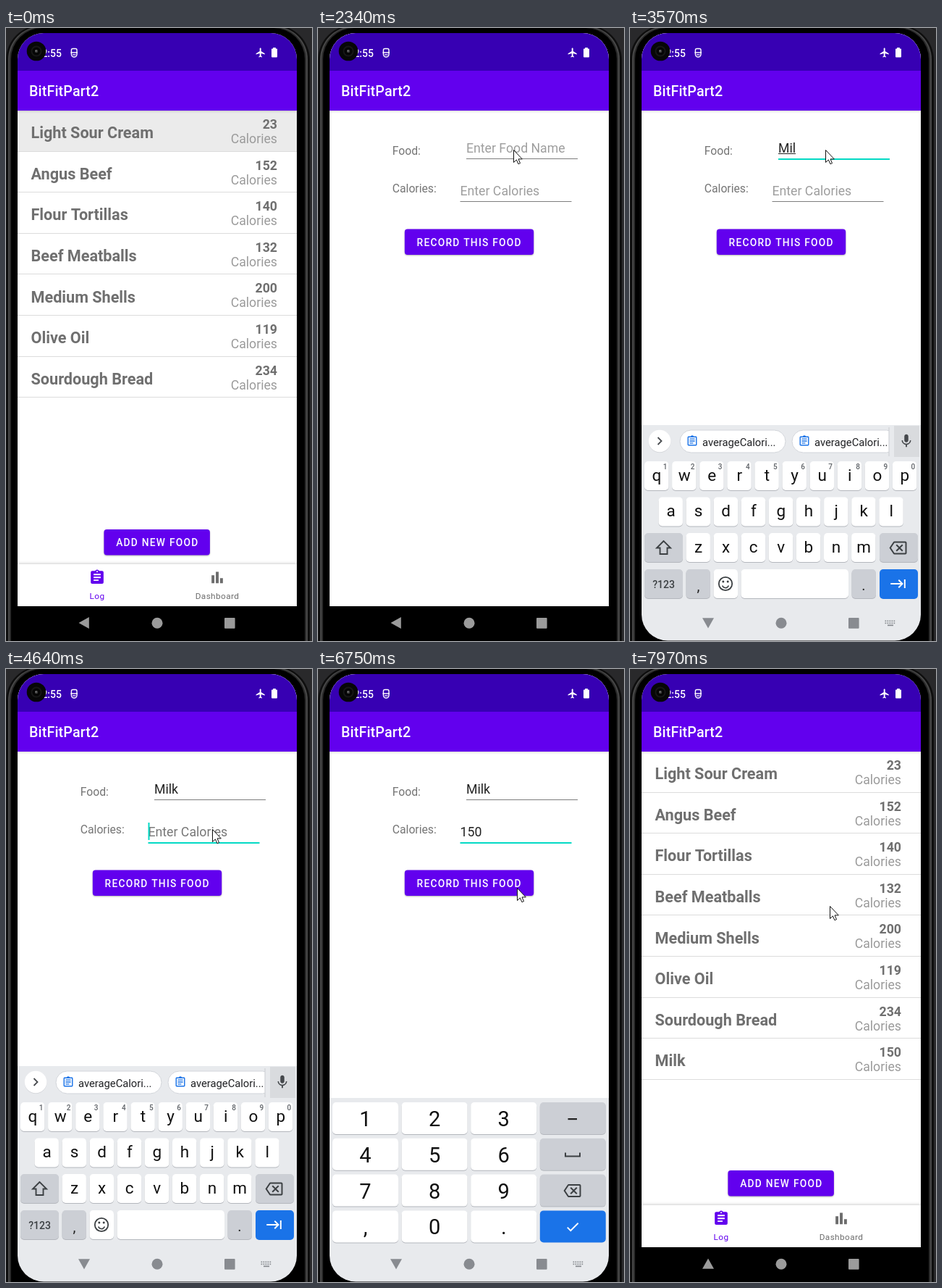
These frames come from a looping animation (423 px wide and 846 px high, 8000 ms). An HTML page with a canvas:

```html
<!DOCTYPE html>
<html lang="en">
<head>
<meta charset="utf-8">
<title>Food log</title>
<style>
html, body { margin: 0; width: 100%; height: 100%; overflow: hidden; background: #2a2a2a; }
canvas { display: block; width: 423px; height: 846px; }
</style>
</head>
<body>
<canvas id="stage"></canvas>
<script>
const W = 423, H = 846, LOOP = 8000;
const canvas = document.getElementById('stage');
const dpr = window.devicePixelRatio || 1;
canvas.width = W * dpr;
canvas.height = H * dpr;
const c = canvas.getContext('2d');

const PURPLE = '#6200ee', DARK = '#3700b3', TEAL = '#03dac5', GREY = '#757575';
const KB = '#e8eaed', KEY_GREY = '#cccfd5', BLUE = '#1a73e8';

const ICON = {
  plane: 'M21 16v-2l-8-5V3.5c0-.83-.67-1.5-1.5-1.5S10 2.67 10 3.5V9l-8 5v2l8-2.5V19l-2 1.5V22l3.5-1 3.5 1v-1.5L13 19v-5.5l8 2.5z',
  log: 'M19 3h-4.18C14.4 1.84 13.3 1 12 1c-1.3 0-2.4.84-2.82 2H5c-1.1 0-2 .9-2 2v14c0 1.1.9 2 2 2h14c1.1 0 2-.9 2-2V5c0-1.1-.9-2-2-2zm-7 0c.55 0 1 .45 1 1s-.45 1-1 1-1-.45-1-1 .45-1 1-1zm2 14H7v-2h7v2zm3-4H7v-2h10v2zm0-4H7V7h10v2z',
  bars: 'M4 9h4v11H4zM16 13h4v7h-4zM10 4h4v16h-4z',
  erase: 'M22 3H7c-.69 0-1.23.35-1.59.88L0 12l5.41 8.11c.36.53.9.89 1.59.89h15c1.1 0 2-.9 2-2V5c0-1.1-.9-2-2-2zm0 16H7.07L2.4 12l4.66-7H22v14zm-11.59-2L14 13.41 17.59 17 19 15.59 15.41 12 19 8.41 17.59 7 14 10.59 10.41 7 9 8.41 12.59 12 9 15.59z',
  next: 'M11.59 7.41L15.17 11H1v2h14.17l-3.59 3.59L13 18l6-6-6-6-1.41 1.41zM20 6v12h2V6h-2z',
  mic: 'M12 14c1.66 0 3-1.34 3-3V5c0-1.66-1.34-3-3-3S9 3.34 9 5v6c0 1.66 1.34 3 3 3zm5.3-3c0 3-2.54 5.1-5.3 5.1S6.7 14 6.7 11H5c0 3.41 2.72 6.23 6 6.72V21h2v-3.28c3.28-.48 6-3.3 6-6.72h-1.7z',
  tick: 'M9 16.17L4.83 12l-1.42 1.41L9 19 21 7l-1.41-1.41z',
  clip: 'M19 3h-4.2a3 3 0 0 0-5.6 0H5c-1.1 0-2 .9-2 2v14c0 1.1.9 2 2 2h14c1.1 0 2-.9 2-2V5c0-1.1-.9-2-2-2zm0 16H5V5h14zM7 7v2h10V7zM7 11v2h10v-2zM7 15v2h7v-2z',
  arrow: 'M0 0V17L3.9 13.4 6.4 19.2 9 18.1 6.5 12.4H11.8Z'
};
for (const k in ICON) ICON[k] = new Path2D(ICON[k]);

const FOODS = [
  ['Light Sour Cream', 23], ['Angus Beef', 152], ['Flour Tortillas', 140], ['Beef Meatballs', 132],
  ['Medium Shells', 200], ['Olive Oil', 119], ['Sourdough Bread', 234], ['Milk', 150]
];

// Pointer stops: time, x, y
const POINTER = [
  [330, 292, 846], [620, 296, 800], [1020, 276, 780], [1250, 245, 712], [1480, 243, 706],
  [1650, 238, 220], [1850, 250, 192], [2200, 270, 168], [4190, 270, 168], [4500, 285, 221],
  [5870, 285, 221], [6120, 320, 255], [6400, 290, 311], [6670, 275, 302], [7480, 275, 302],
  [7850, 276, 327]
];

const clamp = v => Math.max(0, Math.min(1, v));
const span = (t, a, b) => clamp((t - a) / (b - a));
const smooth = p => p * p * (3 - 2 * p);
const mix = (a, b, p) => a + (b - a) * p;

// Material standard curve, cubic-bezier(.4, 0, .2, 1)
function standard(p) {
  let lo = 0, hi = 1, s = p;
  for (let i = 0; i < 16; i++) {
    s = (lo + hi) / 2;
    const x = 1.2 * s * (1 - s) ** 2 + 0.6 * s * s * (1 - s) + s ** 3;
    if (x < p) lo = s; else hi = s;
  }
  return 3 * s * s * (1 - s) + s ** 3;
}

function rect(x, y, w, h, fill) {
  c.fillStyle = fill;
  c.fillRect(x, y, w, h);
}

function round(x, y, w, h, r, fill, stroke) {
  c.beginPath();
  c.roundRect(x, y, w, h, r);
  if (fill) { c.fillStyle = fill; c.fill(); }
  if (stroke) { c.strokeStyle = stroke; c.stroke(); }
}

function disc(x, y, r, fill) {
  c.beginPath();
  c.arc(x, y, r, 0, 7);
  c.fillStyle = fill;
  c.fill();
}

function arc(x, y, r, from, to, color, width) {
  c.beginPath();
  c.arc(x, y, r, from, to);
  c.strokeStyle = color;
  c.lineWidth = width;
  c.stroke();
  c.lineWidth = 1;
}

function line(points, color, width = 1) {
  c.beginPath();
  points.forEach(([x, y], i) => i ? c.lineTo(x, y) : c.moveTo(x, y));
  c.strokeStyle = color;
  c.lineWidth = width;
  c.stroke();
  c.lineWidth = 1;
}

function text(s, x, y, size, color, weight = 400, align = 'left', gap = 0) {
  c.font = `${weight} ${size}px Roboto, sans-serif`;
  c.textAlign = align;
  c.letterSpacing = gap + 'px';
  c.fillStyle = color;
  c.fillText(s, x, y);
  c.letterSpacing = '0px';
}

function icon(name, x, y, scale, color) {
  c.save();
  c.translate(x, y);
  c.scale(scale, scale);
  c.translate(-12, -12);
  c.fillStyle = color;
  c.fill(ICON[name]);
  c.restore();
}

function withShadow(color, blur, dy, draw) {
  c.save();
  c.shadowColor = color;
  c.shadowBlur = blur * dpr;
  c.shadowOffsetY = dy * dpr;
  draw();
  c.restore();
}

function phone() {
  rect(0, 0, W, H, '#29292b');
  round(0, -4, 420, 900, 48, '#0e0e0e');
  round(3, -2, 414, 900, 45, '#484848');
  round(5, -1, 410, 900, 44, '#2a2a2a');
  round(7, 0, 406, 900, 43, '#000');
}

function appBar() {
  rect(16, 7, 386, 52, DARK);
  withShadow('rgba(0,0,0,.18)', 3, 1, () => rect(16, 59, 386, 55, PURPLE));
  rect(16, 57, 386, 2, DARK);
  text('BitFitPart2', 32, 94, 19.66, '#fff', 500, 'left', 0.15);
}

function button(label, x, y, w, press) {
  withShadow('rgba(0,0,0,.3)', 2 + 4 * press, 1 + press, () => round(x, y, w, 35.4, 4, PURPLE));
  if (press) round(x, y, w, 35.4, 4, `rgba(255,255,255,${0.18 * press})`);
  text(label, x + 16.8, y + 23, 13.76, '#fff', 500, 'left', 1.26);
}

function logScreen(t) {
  rect(16, 7, 386, 791, '#fff');
  const glow = 1 - span(t, 260, 480);
  if (glow) rect(16, 114, 386, 56, `rgba(0,0,0,${0.08 * glow})`);
  FOODS.slice(0, t > 7000 ? 8 : 7).forEach(([name, kcal], i) => {
    const y = 114 + i * 56.55;
    text(name, 34.5, y + 38.3, 21.63, '#6f6f6f', 700);
    text(kcal, 375, y + 25.2, 17.7, '#6f6f6f', 700, 'right');
    text('Calories', 375, y + 45.2, 17.7, '#9b9b9b', 400, 'right');
    rect(16, Math.round(y + 55.8), 386, 1, '#dcdcdc');
  });
  button('ADD NEW FOOD', 135.4, 692, 146.5, span(t, 1370, 1480) * (t < 2400));
  withShadow('rgba(0,0,0,.2)', 4, -1, () => rect(16, 740, 386, 58, '#fff'));
  icon('log', 126, 758.2, 0.983, PURPLE);
  icon('bars', 292, 758.3, 0.983, '#6d6d6d');
  text('Log', 126, 788, 11.8, PURPLE, 400, 'center', 0.4);
  text('Dashboard', 292, 788, 11.8, '#6d6d6d', 400, 'center', 0.4);
  appBar();
}

function field(x, y, value, hint, focus, hintColor) {
  text(value || hint, x, y, 17.7, value ? '#212121' : hintColor);
  if (focus) {
    rect(x, y + 8, 154, 2, TEAL);
    if (!value) rect(x, y - 19, 2, 24, TEAL);
  } else {
    rect(x, y + 8, 154, 1, '#7d7d7d');
  }
}

function formScreen(t) {
  rect(16, 7, 386, 791, '#fff');
  const onFood = t > 2420 && t < 4500, onKcal = t >= 4500;
  const food = 'Milk'.slice(0, [3300, 3430, 3560, 3690].filter(k => t >= k).length);
  const kcal = '150'.slice(0, [4910, 5460, 5870].filter(k => t >= k).length);
  text('Food:', 102.8, 174.5, 15.73, GREY);
  text('Calories:', 102.8, 227.3, 15.73, GREY);
  field(205, 172, food, 'Enter Food Name', onFood, '#9e9e9e');
  field(196.5, 231, kcal, 'Enter Calories', onKcal, onKcal ? '#777' : '#9e9e9e');
  if (food && onFood) rect(205, 173, t < 3900 ? 24 : 33, 1, '#212121');
  button('RECORD THIS FOOD', 119.8, 277.6, 178.4, span(t, 6830, 6950));
  appBar();
}

function key(x, y, w, h, fill = '#fff') {
  if (fill !== BLUE) round(x, y + 1, w, h, 5, '#b4b7bd');
  round(x, y, w, h, 5, fill);
}

function chip(x, textX, scale) {
  c.save();
  c.translate(x + 73, 570.5);
  c.scale(scale, scale);
  c.translate(-x - 73, -570.5);
  round(x, 555, 146, 31, 15.5, '#fff', '#d2d5da');
  icon('clip', x + 17, 570, 0.72, BLUE);
  text('averageCalori...', textX, 576.5, 14.75, '#202124');
  c.restore();
}

function letters(t) {
  rect(16, 548, 386, 298, KB);
  disc(41, 571, 15.3, '#d5d7db');
  disc(41, 570, 15.3, '#fff');
  line([[38.5, 565], [43.5, 570], [38.5, 575]], '#4a4d51', 1.8);
  if (t >= 2950) {
    c.save();
    c.beginPath();
    c.rect(60, 548, 298, 46);
    c.clip();
    const p = smooth(span(t, 3160, 3300));
    c.globalAlpha = mix(0.45, 1, p);
    chip(69, 100, mix(0.18, 1, p));
    if (p) chip(224, 255, p);
    c.restore();
  }
  rect(357.5, 551, 1, 40, '#c9ccd1');
  rect(365, 549, 35, 43, '#d9dbde');
  icon('mic', 382, 570, 0.92, '#45484c');

  [['qwertyuiop', 20, 598], ['asdfghjkl', 39.5, 647.5], ['zxcvbnm', 77.5, 697]].forEach(([row, x0, y], r) => {
    [...row].forEach((ch, i) => {
      const x = x0 + i * 38.1;
      key(x, y, 33.4, 40);
      text(ch, x + 17, y + 26.8, 22.5, '#111', 400, 'center');
      if (!r) text((i + 1) % 10, x + 28.5, y + 10.5, 10, '#5f6368', 500, 'center');
    });
  });

  key(20, 697, 53, 40, KEY_GREY);
  line([[46.5, 708], [37, 717.5], [41.5, 717.5], [41.5, 726], [51.5, 726], [51.5, 717.5], [56, 717.5], [46.5, 708], [45, 709.5]], '#3c4043', 1.9);
  key(345, 697, 53, 40, KEY_GREY);
  icon('erase', 370.5, 717.5, 1, '#3c4043');

  const y = 747;
  key(20, y, 53, 40, KEY_GREY);
  text('?123', 46.5, y + 25.5, 14, '#3c4043', 500, 'center');
  key(77.5, y, 33.4, 40, KEY_GREY);
  text(',', 94.5, y + 29.5, 20, '#222', 400, 'center');
  key(115.6, y, 33.4, 40);
  arc(132, y + 20, 9.2, 0, 7, '#3c4043', 1.8);
  arc(132, y + 21, 4.6, 0.35, 2.8, '#3c4043', 1.7);
  disc(128.8, y + 17, 1.5, '#3c4043');
  disc(135.2, y + 17, 1.5, '#3c4043');
  key(153.5, y, 148.5, 40);
  key(306.5, y, 33.4, 40, KEY_GREY);
  text('.', 323, y + 29, 20, '#222', 400, 'center');
  key(345, y, 53, 41, BLUE);
  icon('next', 371, y + 20, 0.98, '#fff');
}

function digits() {
  rect(16, 592, 386, 254, KB);
  ['123-', '456_', '789<', ',0.+'].forEach((row, r) => [...row].forEach((ch, i) => {
    const x = 20 + i * 95.6, y = 598 + r * 49.8, side = i === 3;
    key(x, y, 91, 44, side ? r === 3 ? BLUE : KEY_GREY : '#fff');
    if (!side) text(ch, x + 45.5, y + 33, 29, '#111', 400, 'center');
  }));
  rect(345.5, 620, 12.5, 2.2, '#222');
  line([[342, 667.5], [342, 672.5], [362, 672.5], [362, 667.5]], '#3c4043', 2);
  icon('erase', 351.5, 720, 1, '#3c4043');
  icon('tick', 352, 770, 0.92, '#fff');
}

function navBar(t, up) {
  const settled = t >= 3160;
  const color = !up ? '#9b9b9b' : settled ? '#888b90' : '#c1c3c7';
  const turn = t < 7620
    ? mix(0, -Math.PI / 2, smooth(span(t, 3160, 3300)))
    : mix(-Math.PI / 2, Math.PI / 2, smooth(span(t, 7620, 7950)));
  c.save();
  c.translate(108, 821);
  c.rotate(turn);
  c.beginPath();
  c.moveTo(-7.5, 0);
  c.lineTo(6.8, -8);
  c.lineTo(6.8, 8);
  c.fillStyle = color;
  c.fill();
  c.restore();
  disc(209, 821.3, 7.5, color);
  round(302, 814, 14.6, 14.8, 1, color);
  if (up && t >= 2750) {
    for (let r = 0; r < 2; r++)
      for (let i = 0; i < 5; i++) rect(352.5 + i * 3, 817.5 + r * 3, 1.7, 1.7, color);
    rect(356, 823.5, 8, 1.7, color);
  }
}

function statusBar() {
  text('12:55', 76.8, 39.6, 13.9, '#fff', 500, 'right');
  c.lineWidth = 1.4;
  round(90.4, 28.5, 7.6, 11.5, [2, 2, 3.8, 3.8], null, '#fff');
  c.lineWidth = 1;
  rect(89.4, 33.2, 9.6, 1.4, '#fff');
  rect(92, 36.3, 4.5, 1.2, '#fff');
  icon('plane', 352, 34, 0.64, '#fff');
  round(367, 28.4, 8, 12.2, 1, '#fff');
  rect(369.2, 27, 3.6, 2, '#fff');
  disc(42, 32, 13.3, '#070707');
  disc(42, 32, 7.5, '#171717');
  disc(42, 32, 5.6, '#050505');
  disc(42, 32, 2.2, '#3a3a3a');
  disc(41.5, 31.5, 0.9, '#888');
}

function pointer(t) {
  if (t < POINTER[0][0]) return;
  let i = POINTER.findIndex(p => p[0] > t);
  if (i < 0) i = POINTER.length - 1;
  const a = POINTER[i - 1], b = POINTER[i], p = smooth(span(t, a[0], b[0]));
  c.save();
  c.translate(mix(a[1], b[1], p) + 0.5, mix(a[2], b[2], p) + 0.5);
  c.fillStyle = '#fff';
  c.strokeStyle = '#111';
  c.fill(ICON.arrow);
  c.stroke(ICON.arrow);
  c.restore();
}

function draw(t) {
  c.setTransform(dpr, 0, 0, dpr, 0, 0);
  c.textBaseline = 'alphabetic';
  phone();
  c.save();
  c.beginPath();
  c.roundRect(16, 7, 386, 838.5, 36);
  c.clip();
  rect(16, 7, 386, 839, '#000');

  // The form wipes in from the bottom and leaves the same way.
  const shown = t < 5000 ? standard(span(t, 1655, 2080)) : 1 - standard(span(t, 7415, 7840));
  c.save();
  c.beginPath();
  c.rect(16, 7, 386, 791);
  c.clip();
  if (shown < 1) logScreen(t);
  if (shown > 0) {
    c.beginPath();
    c.rect(16, mix(798, 7, shown), 386, 791);
    c.clip();
    c.translate(0, 32 * (1 - shown));
    formScreen(t);
  }
  c.restore();

  const up = t > 2480 && t < 7860;
  if (up) {
    const rise = mix(300, 11, 1 - (1 - span(t, 2480, 2680)) ** 2);
    const settle = 11 * smooth(span(t, 3160, 3300));
    c.save();
    c.translate(0, rise - settle + 256 * span(t, 7600, 7860) ** 2);
    if (t < 4705) letters(t); else digits();
    c.restore();
  }
  navBar(t, up);
  statusBar();
  c.restore();
  pointer(t);
}

const start = performance.now();
function tick() {
  draw((performance.now() - start) % LOOP);
  requestAnimationFrame(tick);
}
tick();
</script>
</body>
</html>
```
